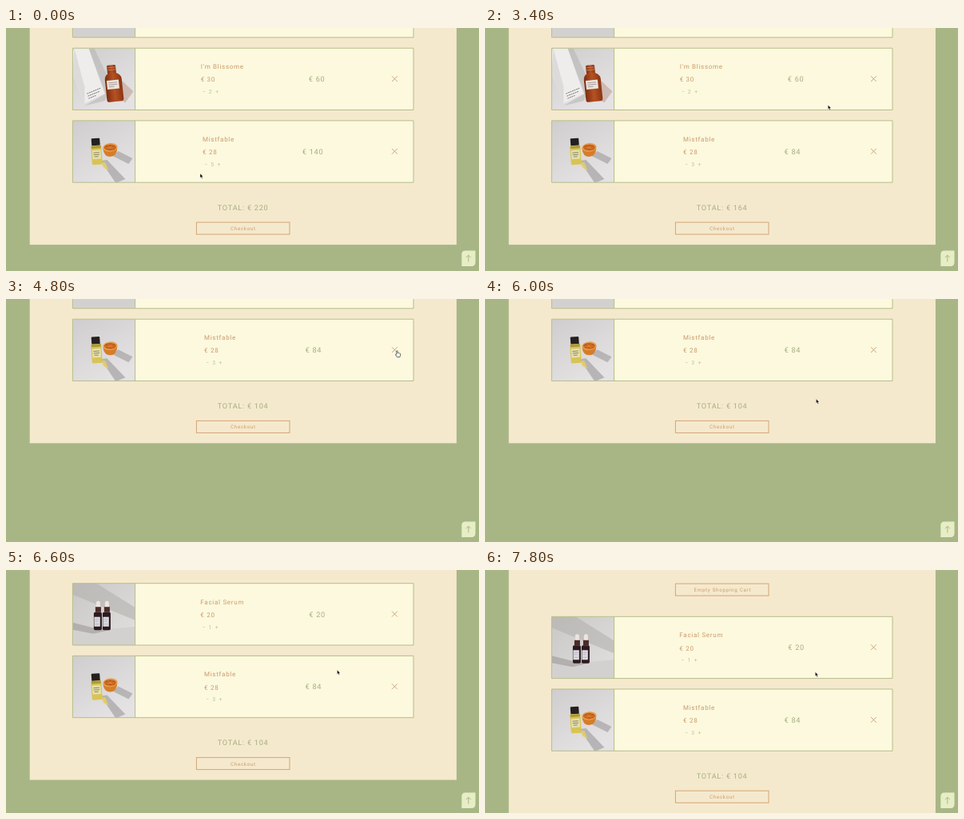
Animation of 592 by 304 pixels, one loop 8000 ms. Source, as an HTML page:

```html
<!DOCTYPE html>
<html lang="en">
<head>
<meta charset="utf-8">
<title>Shopping cart</title>
<style>
  html, body { margin: 0; width: 100%; height: 100%; overflow: hidden; background: #a8b686; }
  svg { display: block; width: 592px; height: 304px; }
  text { font-family: Roboto, Arial, sans-serif; letter-spacing: .72px; text-rendering: geometricPrecision; white-space: pre; }
  .name { font-size: 8px; fill: #cc996c; }
  .sum { font-size: 9.2px; fill: #a5b080; }
  .qty { font-size: 6.8px; fill: #b9c496; letter-spacing: 0; text-anchor: middle; }
  .btn { font-size: 6.2px; fill: #cc9c70; }
  .edge { fill: none; stroke: #b5bd8a; }
  .box { fill: none; stroke: #d3a577; }
</style>
</head>
<body>
<svg id="stage" viewBox="0 0 592 304">
  <defs>
    <linearGradient id="wall" x1="0" y1="0" x2="1" y2="1">
      <stop offset="0" stop-color="#c9c7c5"/><stop offset="1" stop-color="#e3e1e0"/>
    </linearGradient>
    <linearGradient id="table" x1="0" y1="0" x2=".6" y2="1">
      <stop offset="0" stop-color="#cfcdcd"/><stop offset="1" stop-color="#e4e2e3"/>
    </linearGradient>
    <linearGradient id="amber">
      <stop offset="0" stop-color="#7c2d10"/><stop offset=".5" stop-color="#b55223"/><stop offset="1" stop-color="#8a3413"/>
    </linearGradient>
    <clipPath id="crop"><rect width="78" height="77.3"/></clipPath>

    <g id="serum" clip-path="url(#crop)">
      <rect width="78" height="78" fill="url(#wall)"/>
      <path d="M0 0H30L78 30V46L0 14Z" fill="#b5b2b0" opacity=".6"/>
      <path d="M0 61L78 54V78H0Z" fill="#d3d1cf"/>
      <path d="M0 49L28 56L48 58L26 63L0 58Z" fill="#a5a2a0" opacity=".7"/>
      <g id="dropper">
        <rect x="29.5" y="22" width="5" height="9" rx="2.4" fill="#efe4df"/>
        <rect x="28.5" y="29.5" width="7" height="6.5" fill="#4b2b28"/>
        <rect x="26.5" y="36" width="10" height="22.5" rx="1.8" fill="#2c1a20"/>
        <rect x="27" y="42" width="7.4" height="12" fill="#dedbe2"/>
        <path d="M28 45h5M28 47.5h4M28 51h5" stroke="#9a97a3" stroke-width=".6"/>
      </g>
      <use href="#dropper" x="11"/>
    </g>

    <g id="amberBottle" clip-path="url(#crop)">
      <rect width="78" height="78" fill="url(#table)"/>
      <path d="M20 0L41 57L15 72L40 66L50 48L27 0Z" fill="#b9b7b6" opacity=".6"/>
      <path d="M2 0H20L40 57L15 69L0 32V4Z" fill="#eeedec"/>
      <path d="M2 0L15 48L15 69L0 32Z" fill="#dddbd9"/>
      <path d="M18 57l17-7M19 60l15-6M20 63l9-3.7" stroke="#77736f" stroke-width="1" stroke-dasharray="2 .7"/>
      <path d="M61 40L76 54L66 68L58 64Z" fill="#b99685" opacity=".5"/>
      <g transform="rotate(-6 51 45)">
        <rect x="45" y="21" width="11" height="11" rx="1.5" fill="url(#amber)"/>
        <path d="M45 24h11M45 27h11" stroke="#d0a082" stroke-width=".6"/>
        <path d="M46 31h9q7 3 7 8v25q0 3-3 3H44q-3 0-3-3V39q0-5 5-8Z" fill="url(#amber)"/>
        <rect x="43" y="40" width="15" height="11" fill="#ece5e0"/>
        <path d="M45 43h11M45 45.5h11M45 48h7" stroke="#8d817a" stroke-width=".7"/>
      </g>
    </g>

    <g id="citrus" clip-path="url(#crop)">
      <rect width="78" height="78" fill="url(#table)"/>
      <path d="M35 50L43 49L66 73L54 78Z" fill="#a8a6a8" opacity=".75"/>
      <path d="M50 44L57 38L75 47L70 54Z" fill="#aaa7a8" opacity=".75"/>
      <path d="M35 52L41 52L45 62L39 59Z" fill="#e6cf64" opacity=".85"/>
      <path d="M38 35q1 10 9 10t9-11Z" fill="#d67d28"/>
      <ellipse cx="47" cy="33.5" rx="9.2" ry="5.3" fill="#e2a052" transform="rotate(-5 47 33.5)"/>
      <ellipse cx="47" cy="33.6" rx="7.4" ry="3.8" fill="#c65b18"/>
      <path d="M41 34h12M44 31l6 5M50 31l-6 5" stroke="#e29a48" stroke-width=".6"/>
      <g transform="rotate(-4 30 40)">
        <rect x="24.5" y="22" width="10.5" height="9.5" rx="1" fill="#25201f"/>
        <rect x="23.4" y="31" width="13" height="24" rx="1.6" fill="#d8c455"/>
        <rect x="24" y="31.3" width="11.8" height="3.4" fill="#ab9a3c"/>
        <rect x="24.6" y="37" width="10.5" height="11" fill="#e5e0ae"/>
        <path d="M26 40h7.5M26 42.5h7.5M27 45h5" stroke="#747150" stroke-width=".8"/>
      </g>
    </g>
  </defs>
  <rect width="592" height="304" fill="#a8b686"/>
  <rect id="panel" x="29.7" width="534.2" fill="#f5e9cd"/>
  <g id="page"></g>
  <path d="M575 278.5H587.5V293Q587.5 298 582.5 298H570.3V283.2Q570.3 278.5 575 278.5Z" fill="#e7eec6"/>
  <path d="M578.8 292.5V284.2M575.8 287.2L578.8 284.2L581.8 287.2" fill="none" stroke="#a5b27e" stroke-width=".9"/>
  <path id="arrow" d="M0 0V5L1.2 4L2.1 6L3 5.6L2.1 3.7L3.6 3.5Z" fill="#111" stroke="#fff" stroke-width=".25"/>
  <path id="hand" d="M-1.8 .8V-3.4Q-1.1 -4.4-.4 -3.4V-.9Q.3 -1.5 .9 -.8Q1.6 -1.2 2.1 -.4Q2.9 -.5 3.1 .3V1.8L2.2 4.2H-1.1L-3.2 1.1Q-2.9 .1-1.8 .8Z" fill="#fff" stroke="#333" stroke-width=".75"/>
</svg>
<script>
const $ = id => document.getElementById(id);
const LOOP = 8000, STEP = 200, PITCH = 90.7;

function add(parent, tag, attrs, text) {
  const el = document.createElementNS('http://www.w3.org/2000/svg', tag);
  for (const k in attrs) el.setAttribute(k, attrs[k]);
  if (text) el.textContent = text;
  return parent.appendChild(el);
}
const label = (parent, cls, x, y, text) => add(parent, 'text', { class: cls, x, y }, text);
const moveY = (el, y) => el.setAttribute('transform', `translate(0 ${y})`);

function makeCard(pic, title, price, x, sumX, qty) {
  const g = add($('page'), 'g', {});
  add(g, 'rect', { x: 83.4, width: 426.6, height: 77.3, fill: '#fcf9de' });
  add(g, 'use', { href: '#' + pic, x: 83.4 });
  add(g, 'path', { class: 'edge', d: 'M83.4 0H510V77.3H83.4ZM161.6 0V77.3' });
  add(g, 'path', { d: 'M483 35l6.8 6.8M489.8 35l-6.8 6.8', stroke: '#c99c74', 'stroke-width': .9 });
  const info = add(g, 'g', {});
  label(info, 'name', 0, 26, title);
  label(info, 'name', 0, 42.3, '€ ' + price);
  label(info, 'qty', 4.2, 57, '−');
  const count = label(info, 'qty', 12.1, 57, ' ');
  label(info, 'qty', 20.4, 57, '+');
  const sum = label(g, 'sum', 0, 42, ' ');
  const set = (n, infoX, x2) => {
    info.setAttribute('transform', `translate(${infoX} 0)`);
    count.textContent = n;
    sum.setAttribute('x', x2);
    sum.textContent = '€ ' + n * price;
  };
  set(qty, x, sumX);
  return { g, set };
}

function makeButton(parent, y, x, text) {
  add(parent, 'rect', { class: 'box', x: 238.4, y, width: 116.6, height: 15 });
  label(parent, 'btn', x, y + 10, text);
}

const header = add($('page'), 'g', {});
makeButton(header, -41.2, 261.5, 'Empty Shopping Cart');
const serum = makeCard('serum', 'Facial Serum', 20, 243.3, 379.3, 1);
const amber = makeCard('amberBottle', "I'm Blissome", 30, 243.7, 378.8, 2);
const citrus = makeCard('citrus', 'Mistfable', 28, 246, 370.8, 5);
const footer = add($('page'), 'g', {});
const total = label(footer, 'sum', 264.8, 111.9, ' ');
makeButton(footer, 127.2, 281, 'Checkout');

// [ms, quantity, info x, sum x]
const qtySteps = [[0, 5, 246, 370.8], [1200, 4, 246, 370.8], [1800, 3, 248, 374.6]];
// [ms, top of the first card]
const scrollSteps = [[0, -65.5], [6400, -55.2], [6600, 16.7], [6800, 44], [7000, 55], [7200, 58.3]];
// [start, end, x, y, hand while moving, hand on arrival]
const moves = [
  [0, 0, 243, 182.3, 0, 0],
  [0, 600, 254.4, 176.6, 0, 1],
  [2600, 3800, 490.6, 68.5, 0, 1],
  [5000, 6000, 414.5, 125.3, 0, 0],
  [7600, 7800, 413.4, 127.7, 0, 0]
];
const REMOVED = 4800;

const latest = (rows, t) => rows.filter(r => r[0] <= t).pop();
const ease = p => p * p * (3 - 2 * p);

function pointer(t) {
  let [, , x, y] = moves[0], hand = 0;
  for (const [from, to, tx, ty, during, after] of moves.slice(1)) {
    if (t <= from) break;
    const p = ease(Math.min(1, (t - from) / (to - from)));
    x += (tx - x) * p;
    y += (ty - y) * p;
    hand = t < to ? during : after;
  }
  return { x, y, hand };
}

function render(t) {
  const [, n, infoX, sumX] = latest(qtySteps, t);
  const top = latest(scrollSteps, t)[1];
  const gone = t >= REMOVED;
  const last = top + PITCH * (gone ? 1 : 2);

  citrus.set(n, infoX, sumX);
  total.textContent = 'TOTAL: € ' + (20 + (gone ? 0 : 60) + n * 28);
  amber.g.style.display = gone ? 'none' : '';
  moveY(header, top);
  moveY(serum.g, top);
  moveY(amber.g, top + PITCH);
  moveY(citrus.g, last);
  moveY(footer, last);
  $('panel').setAttribute('height', last + 155.2);

  const { x, y, hand } = pointer(t);
  for (const id of ['arrow', 'hand']) {
    $(id).setAttribute('transform', `translate(${x} ${y})`);
    $(id).style.display = (id === 'hand') === !!hand ? '' : 'none';
  }
}

const start = performance.now();
function tick(now) {
  const t = Math.max(0, now - start) % LOOP;
  render(Math.floor(t / STEP) * STEP);
  requestAnimationFrame(tick);
}
render(0);
requestAnimationFrame(tick);
</script>
</body>
</html>
```
